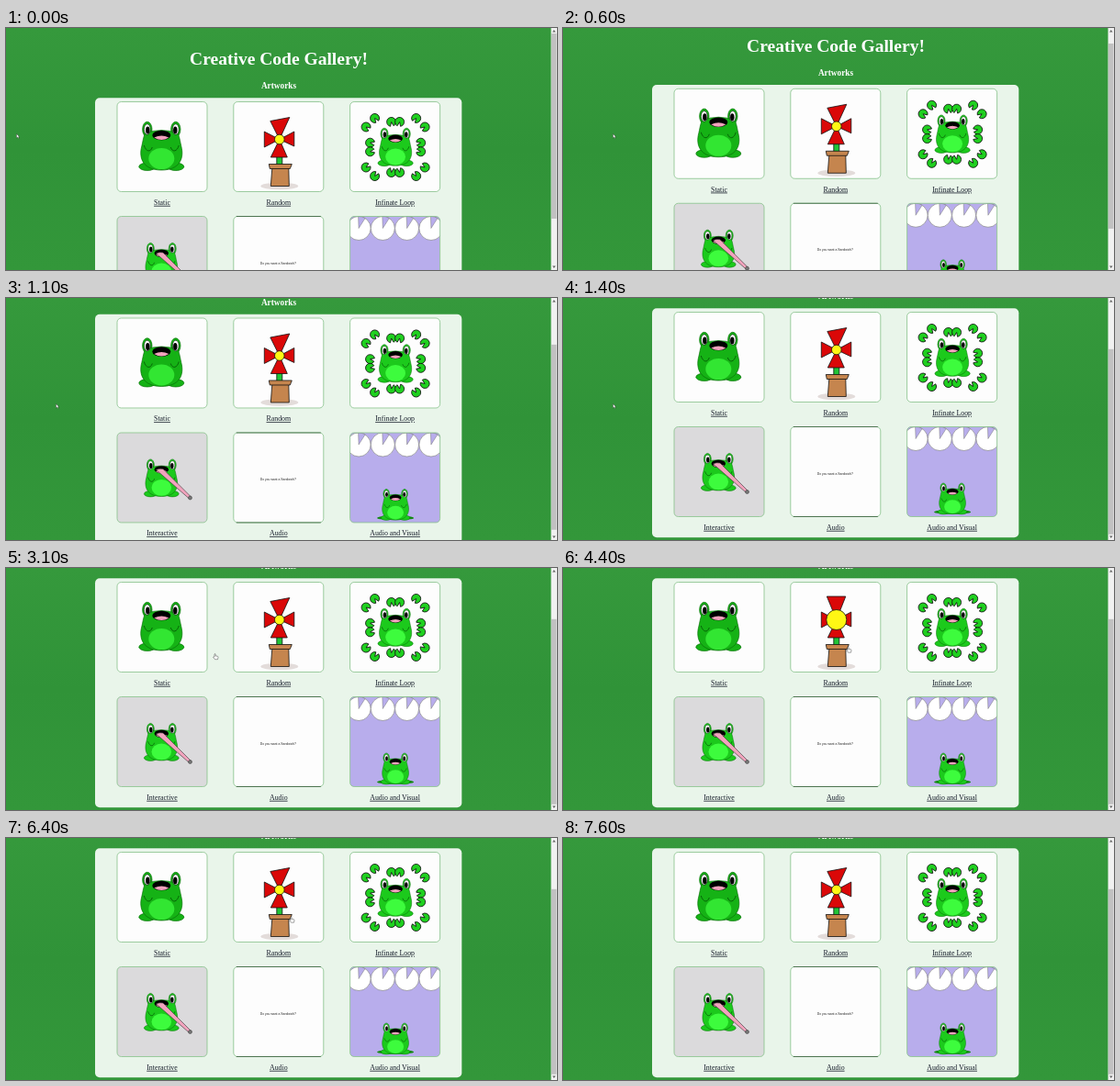
Animation of 600 by 264 pixels, one loop 8000 ms. Source, as an HTML page:

```html
<!DOCTYPE html>
<html lang="en">
<head>
<meta charset="utf-8">
<title>Creative Code Gallery</title>
<style>
  html, body { margin: 0; width: 100%; height: 100%; overflow: hidden; background: #329639; }
  svg { display: block; width: 100vw; height: 100vh; }
  text { font-family: "Liberation Serif", "Times New Roman", serif; text-anchor: middle; }
  .heading { fill: #fff; font-weight: bold; }
  .link { font-size: 7.85px; fill: #171d2b; text-decoration: underline; }
  .question { font: 3.4px "Liberation Sans", Arial, sans-serif; fill: #222; }
  .ink { stroke: #111; stroke-width: .8; stroke-linejoin: round; }
  .skin { fill: var(--skin); stroke: #087008; stroke-width: .7; }
  .belly { fill: var(--belly); }
  .calm { --skin: #15b215; --belly: #32e632; }
  .bright { --skin: #1cca1c; --belly: #3dfc3d; }
</style>
</head>
<body>
<svg viewBox="0 0 600 264" xmlns="http://www.w3.org/2000/svg">
  <defs>
    <linearGradient id="meadow" x2="0" y2="1">
      <stop stop-color="#35993c"/><stop offset=".5" stop-color="#309338"/><stop offset="1" stop-color="#33973a"/>
    </linearGradient>
    <clipPath id="card"><rect width="98" height="98" rx="4.5"/></clipPath>

    <g id="frog">
      <g class="skin">
        <ellipse cx="-15.5" cy="22.3" rx="9" ry="4.2"/>
        <ellipse cx="15.5" cy="22.3" rx="9" ry="4.2"/>
        <ellipse cx="-15.5" cy="-18.5" rx="5.2" ry="8.2"/>
        <ellipse cx="15.5" cy="-18.5" rx="5.2" ry="8.2"/>
        <path d="M-18-14Q0-21 18-14C20-9 20.5-4 21.5 0C25 13 20 26 0 26S-25 13-21.5 0C-20.5-4-20-9-18-14Z"/>
      </g>
      <ellipse class="belly" cy="13.5" rx="14" ry="11.5"/>
      <path d="M-19-1C-17 6-12 7-10 1M19-1C17 6 12 7 10 1" fill="none" stroke="#076407" stroke-width="1"/>
      <g id="eye">
        <ellipse cx="-15.5" cy="-18.5" rx="3.4" ry="5.8" fill="#fff" stroke="#111" stroke-width=".6"/>
        <ellipse cx="-15" cy="-17.5" rx="2.2" ry="4"/>
      </g>
      <use href="#eye" transform="scale(-1 1)"/>
      <ellipse cy="-12" rx="10" ry="5.3"/>
      <path d="M-8-9.5Q0-13.5 8-9.5Q0-4.5-8-9.5Z" fill="#f2a3bd"/>
    </g>

    <path id="pad" d="M0 0L4.6-1.8A5 5 0 1 0 4.6 1.8Z" fill="#1fd01f" class="ink"/>
    <g id="tooth">
      <circle r="13" fill="#fff" stroke="#777" stroke-width=".6"/>
      <path d="M0 0L-.5-13A13 13 0 0 1 7-11Z" fill="#b8adec" stroke="#777" stroke-width=".5"/>
    </g>
  </defs>

  <rect width="600" height="264" fill="url(#meadow)"/>
  <g id="page">
    <text class="heading" x="297" y="40" font-size="19.55">Creative Code Gallery!</text>
    <text class="heading" x="297" y="66.3" font-size="9.3">Artworks</text>
    <rect x="97" y="76.2" width="399.3" height="250" rx="5" fill="#e9f5ea"/>
    <g id="cards"></g>
  </g>

  <rect x="593.5" width="6.5" height="264" fill="#f1f1f1"/>
  <rect id="thumb" x="594" width="5.5" height="202" fill="#c1c1c1"/>
  <path d="M595 4.5L596.8 2L598.6 4.5ZM595 259.5L596.8 262L598.6 259.5Z" fill="#666"/>

  <path id="arrow" d="M0 0V4.5L1.1 3.5L1.9 5L2.6 4.7L1.9 3.2H3.2Z" fill="#fff" stroke="#222" stroke-width=".35"/>
  <path id="hand" d="M0 .4Q.6-.4 1.1.4V2.4L3.4 2.8Q4.2 3 4 4L3.5 6.2H.5L-1.4 3.7Q-1 2.8 0 3.6Z" fill="#fff" stroke="#333" stroke-width=".45"/>
</svg>
<script>
const byId = id => document.getElementById(id);
const frog = (x, y, scale, tone = "bright") =>
  `<use href="#frog" class="${tone}" transform="translate(${x} ${y}) scale(${scale})"/>`;
const signs = [[-1, -1], [1, -1], [-1, 1], [1, 1]];

// Lily pads ring the frog symmetrically, notches facing inwards
const pads = [[22.5, 31.5], [32, 22], [4.5, 27.5], [27.5, 4.8]].flatMap(([x, y]) =>
  signs.map(([sx, sy]) => {
    const angle = Math.atan2(-sy * y, -sx * x) * 180 / Math.PI;
    return `<use href="#pad" transform="translate(${49.5 + sx * x} ${49.5 + sy * y}) rotate(${angle})"/>`;
  })).join("");

const pinwheel = `
  <ellipse cx="50" cy="92" rx="20.5" ry="3.8" fill="#e3dcda"/>
  <path d="M47 58H53V69H47Z" fill="#20c437" class="ink"/>
  <path d="M42 72H60L60.5 92H40.5Z" fill="#c5854e" class="ink"/>
  <path d="M38.5 68H63.5L61.5 73H39.5Z" fill="#c5854e" class="ink"/>
  <path d="M50 41L33.5 32.5V49.5ZM50 41L66 32.5V48.5ZM50 41L40.5 60.5H58.5Z" fill="#da0808" class="ink"/>
  <path id="blade" fill="#da0808" class="ink"/>
  <circle id="hub" cx="50" cy="41" fill="#fff714" class="ink"/>`;

const teeth = [9.5, 35.7, 62, 88.3].map(x => `<use href="#tooth" x="${x}" y="13"/>`).join("");

const artworks = [
  ["Static", "#fdfdfd", frog(48.3, 48.5, 1, "calm")],
  ["Random", "#fdfdfd", pinwheel],
  ["Infinate Loop", "#fdfdfd", pads + frog(49.5, 49.5, .78)],
  ["Interactive", "#dbdadc", frog(48.3, 49.5, .77) +
    `<path d="M42.5 40.5Q46 38.5 50 39.5L80 69.5L78 71.5Z" fill="#f2a3bd" stroke="#333" stroke-width=".6"/>
     <circle cx="79.5" cy="71" r="2" fill="#777" stroke="#333" stroke-width=".5"/>`],
  ["Audio", "#fdfdfd", `<text class="question" x="48.5" y="52">Do you want a Sandwich?</text>`],
  ["Audio and Visual", "#b8adec", teeth +
    `<ellipse cx="49.5" cy="93" rx="20" ry="2.3" fill="#148a14"/>` + frog(49.5, 78.5, .64)]
];

byId("cards").innerHTML = artworks.map(([name, color, art], i) => `
  <g transform="translate(${121 + i % 3 * 126.8} ${80.5 + Math.floor(i / 3) * 125})">
    <g clip-path="url(#card)"><rect width="98" height="98" fill="${color}"/>${art}</g>
    <rect width="98" height="98" rx="4.5" fill="none" stroke="#86c08a" stroke-width=".8"/>
    ${i === 4 ? '<path d="M3 0H95M3 98H95" stroke="#456b48" stroke-width=".9"/>' : ""}
    <text class="link" x="49" y="112.3">${name}</text>
  </g>`).join("");

const progress = (t, start, end) => Math.min(1, Math.max(0, (t - start) / (end - start)));
const mix = (a, b, p) => a + (b - a) * p;

// Pointer stops: time, x, y
const route = [[0, 11.5, 115.5], [300, 54.5, 115.5], [2000, 54.5, 115.5], [2500, 214, 98],
  [2800, 214, 98], [3100, 227, 93.5], [3700, 310, 86], [6500, 310, 86], [7100, 330, -12], [8000, 330, -12]];

function pointerAt(t) {
  const i = Math.max(1, route.findIndex(stop => stop[0] >= t));
  const [from, to] = [route[i - 1], route[i]];
  const p = progress(t, from[0], to[0]);
  return [mix(from[1], to[1], p), mix(from[2], to[2], p)];
}

function render(t) {
  const scroll = 65 * (1 - (1 - progress(t, 500, 1400)) ** 2.1);
  byId("page").setAttribute("transform", `translate(0 ${-scroll})`);
  byId("thumb").setAttribute("y", 6 + scroll * 252 / 329);

  const bloom = progress(t, 3700, 4100) - progress(t, 6100, 6400);
  byId("hub").setAttribute("r", mix(5.3, 11, bloom));
  byId("blade").setAttribute("d",
    `M50 41L${mix(40, 39.5, bloom)} ${mix(21, 15.5, bloom)}L${mix(61, 60, bloom)} ${mix(17, 15.5, bloom)}Z`);

  const [x, y] = pointerAt(t);
  const overLink = x > 121;
  for (const [id, shown] of [["arrow", !overLink], ["hand", overLink]]) {
    byId(id).setAttribute("transform", `translate(${x} ${y})`);
    byId(id).setAttribute("visibility", shown ? "visible" : "hidden");
  }
}

const begin = performance.now();
function tick() {
  const elapsed = (performance.now() - begin) % 8000;
  render(Math.floor(elapsed / 100) * 100);
  requestAnimationFrame(tick);
}
tick();
</script>
</body>
</html>
```
